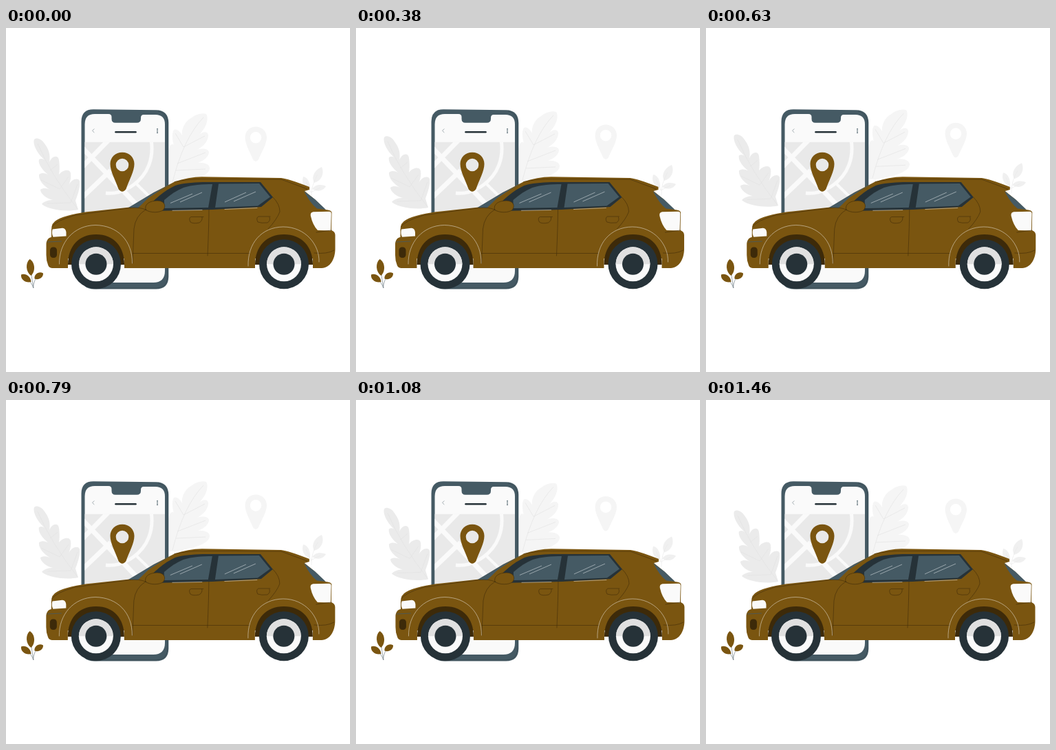
Write an HTML page that moves like this. It is 500 px wide and 500 px high and loops after 1.5 s.

```html
<!DOCTYPE html>
<html lang="en">
<head>
<meta charset="utf-8">
<title>Car and map</title>
<style>
html, body { margin: 0; width: 100%; height: 100%; overflow: hidden; background: #fff; }
svg { display: block; width: 100%; height: 100%; }
.paint { fill: #7a5510; }
.shade { fill: #3d2a09; }
.dark { fill: #263238; }
.slate { fill: #455a64; }
.light { fill: #fafafa; }
.seam { fill: none; stroke: #3d2a09; stroke-width: .55; stroke-linecap: round; stroke-linejoin: round; }
.shine { fill: none; stroke: #e9e4da; stroke-width: .55; stroke-linecap: round; }
.vein { fill: none; stroke: #e0e0e0; stroke-width: .55; }
.road { fill: none; stroke: #fafafa; }
</style>
</head>
<body>
<svg viewBox="0 0 500 500">
  <defs>
    <clipPath id="map"><path d="M114.500 165.500H231V353Q231 370 214 370H131Q114.500 370 114.500 353Z"/></clipPath>
    <g id="wheel">
      <circle r="36" class="dark"/>
      <circle r="25" class="light"/>
      <path d="M-25 0A25 25 0 0 1 25 0Z" fill="#e0e0e0"/>
      <circle r="15.500" class="dark"/>
    </g>
  </defs>

  <g id="back">
    <path fill="#ebebeb" d="M41 162C43 159 51 160 56 168C62 176 65 184 63 195C67 185 76 184 77 192C78 200 78 207 77 213C82 206 93 204 94 211C95 218 93 224 91 229C95 219 106 217 107 223C108 234 103 245 101 251L105 264C92 267 65 266 52 256C56 251 63 250 68 250C59 248 50 241 50 235C54 232 60 233 64 235C55 230 47 221 48 213C52 210 57 211 61 213C53 207 46 197 48 191C51 189 54 190 57 192C48 186 38 170 41 162Z"/>
    <path class="vein" d="M46 168Q65 213 104 263M64 207L75 198M51 221L78 234L91 216M60 255L94 254L104 227"/>
    <path fill="#f5f5f5" d="M291 125C295 131 292 145 279 157C286 149 294 150 294 156C294 166 284 175 272 180C283 173 295 175 295 181C294 190 281 197 267 199C281 193 296 196 296 204C295 216 270 222 245 226L231 225C233 211 234 199 235 188C236 178 238 168 242 169C246 170 247 174 247 179C242 168 240 154 244 148C249 146 253 151 256 156C255 146 260 136 269 131C276 125 285 123 291 125Z"/>
    <path class="vein" stroke="#ececec" d="M287 130Q258 160 242 224M258 173L289 157M249 197L290 181M258 173L246 153M247 207L290 205"/>
    <path fill="#f5f5f5" fill-rule="evenodd" d="M363 143.500C372 143.500 379 150 379 159C379 169 371 181 367 191Q363 197 359 191C355 181 347.500 169 347.500 159C347.500 150 354 143.500 363 143.500ZM363 151A8.300 8.300 0 1 0 363 167.600A8.300 8.300 0 1 0 363 151Z"/>
    <g fill="#f0f0f0">
      <path d="M459 202C463 211 459 222 448 225C443 216 449 206 459 202Z"/>
      <path d="M432 216C439 217 443 226 442 236C433 233 429 225 432 216Z"/>
      <path d="M465 230C460 238 452 238 445 234C450 227 458 227 465 230Z"/>
    </g>
    <path d="M453 213Q443 230 444 246M436 223L443 239L457 232" fill="none" stroke="#e8e8e8" stroke-width=".6"/>
  </g>

  <g id="phone">
    <path class="slate" d="M127 118.300L218 119.300Q236 119.500 236.300 138V361Q236.300 379.500 218 379.500H128Q109.500 379.500 109.500 361V136Q109.500 118.300 127 118.300Z"/>
    <path d="M221 121Q234.500 123 234.800 138V361Q234.800 377.500 218 378H128" fill="none" stroke="#37474f" stroke-width=".6"/>
    <path class="light" d="M129 125H149Q153.500 125 153.500 129.500V132Q153.500 137.800 159 137.800H190Q196 137.800 196 132V130.500Q196 126 200 126H217Q231 126 231 140V353Q231 370 214 370H131Q114.500 370 114.500 353V140Q114.500 125 129 125Z"/>
    <g clip-path="url(#map)">
      <path d="M114 165.500H232V345H114Z" fill="#e9e9e9"/>
      <path class="road" stroke-width="7" d="M107 170L205 273M107 206L150 162M108 249L152 207"/>
      <path class="road" stroke-width="5" d="M211 163C215 188 207 213 184 229C169 239 158 241 145 240"/>
      <path class="road" stroke-width="4" d="M190 227L233 269"/>
    </g>
    <path d="M159.500 151.300H188.500" stroke="#263238" stroke-width="2.600" stroke-linecap="round"/>
    <path d="M128.300 146.500L125.500 149.300L128.300 152" fill="none" stroke="#8c989e" stroke-width=".8"/>
    <g class="slate"><circle cx="220" cy="147" r=".9"/><circle cx="220" cy="149.600" r=".9"/><circle cx="220" cy="152.200" r=".9"/></g>
    <path class="paint" fill-rule="evenodd" d="M169 180.700C179 180.700 186.500 188 186.500 197.500C186.500 208 179.500 220 174.500 234Q169 241.500 163.500 234C158.500 220 151.500 208 151.500 197.500C151.500 188 159 180.700 169 180.700ZM169 189.700A9.300 9.300 0 1 0 169 208.300A9.300 9.300 0 1 0 169 189.700Z"/>
  </g>

  <g id="plant">
    <path d="M36 348Q37 363 40 378M28 363Q36 367 40 378M48 360Q40 365 39.500 378" fill="none" stroke="#78858b" stroke-width=".7"/>
    <g class="paint">
      <path d="M34.500 336C42 340 43.500 353 36.500 360C28.500 355 28 341 34.500 336Z"/>
      <path d="M54 356.500C54.500 363 47 367 41.500 364.500C40.500 358 48 353 54 356.500Z"/>
      <path d="M22 358.500C28 356 36 361 36.500 369C29 371 21 366 22 358.500Z"/>
    </g>
  </g>

  <g id="car">
    <path class="paint" d="M61 344Q58.500 338 58.500 330V315C58.500 309 61 305 66 304V293Q66 283 74 279C84 273 105 268.500 125 266.500L180 260.500L215 239L245 223.500C258 219 272 216.500 285 216.300L400 218Q410 219 441 231L441 235L434 237L450 250L464 264Q473 264.500 473.500 268L473 294Q478.500 296 478.500 301V321C478.500 336 471 348.500 459 349H446V335H362V349H172V335H90V349H67Q62 348.500 61 344Z"/>
    <path class="slate" d="M178 261L215 239L245 224.500L227 234L207 247L192 261.500Z"/>
    <path class="dark" d="M203 265C214 249 231 236 246 229C257 225.500 270 224.500 286 224H370L388 246L371 260L300 264L214 266Z"/>
    <path class="slate" d="M230 262V250C239 242 248 236 258 232C270 228 286 227 300 227L294 261Z"/>
    <path class="slate" d="M309 226.500L368 226L384 245.500L366 258.500L304 261Z"/>
    <path d="M239 254.500L271 241M253 253L285 239M318 253L349 239M331 252L363 238" fill="none" stroke="#d3dade" stroke-width=".6"/>
    <path class="paint" d="M203 264C201 256 209 251 220 251C230 251 233 258 229 264C224 269 209 269 203 264Z" stroke="#3d2a09" stroke-width=".6"/>
    <path class="slate" d="M433 237L449 249L465 264L452 262.500Q443 256 433 237Z"/>
    <path class="light" d="M446.500 267.200L470 266.700Q472.800 266.800 472.800 270L472 294.500L453 294Q446 287 442.800 273Q442 268 446.500 267.200Z"/>
    <path class="light" d="M67.500 292.500L82 290.700Q87 291 87.500 297V302.500L68.500 303.700Q66 299 67.500 292.500Z"/>
    <rect class="shade" x="64" y="318.500" width="10" height="15.500" rx="4.500"/>
    <path d="M60 311L81 310" stroke="#455a64" stroke-width=".8"/>

    <path class="seam" d="M67 289Q72 280 101 272Q143 266 181 261.500M181 261.500Q194 260 203 264M203 264Q188 273 186 292L184 342M295 264Q295 285 293 331M388 246Q398 256 398 267Q394 278 381 292M184 327.500H354M245 223.500Q268 219 287 219.500L400 220L438 234M473 294L451 297M448 327Q467 329 477 323"/>
    <path class="seam" d="M287 274.500H269Q265 276 268 282Q272 285 281 283Q286 280 285 275M384 274H367Q363 276 366 282Q371 284 380 283Q385 280 383 275"/>
    <path class="shine" d="M242 265.300L285 264.500M318 263.500L365 261.500"/>
    <path class="shine" d="M77.500 343C77 312 98 287 130 286.500C162 287 184 309 183.500 342M352 346C351 313 371 289.500 403 289C435 289 456 315 455 340"/>

    <path class="shade" d="M90 344C90 318 105 300 131 300C157 300 172 318 172 344Z"/>
    <path class="shade" d="M362 344C362 318 378 300 404 300C430 300 446 318 446 344Z"/>
    <use href="#wheel" x="131" y="343.300"/>
    <use href="#wheel" x="404" y="343.300"/>
  </g>
</svg>
<script>
const LOOP = 1500, RISE = 6;
const SHAKE = [0, -.5, 1, -2, 2, -2, 2, -2, 1, -.5, 0];
const back = document.getElementById('back');
const car = document.getElementById('car');

function bezier(x1, y1, x2, y2) {
  const at = (a, b, s) => 3 * a * s * (1 - s) ** 2 + 3 * b * s * s * (1 - s) + s ** 3;
  return x => {
    let lo = 0, hi = 1;
    for (let i = 0; i < 20; i++) {
      const mid = (lo + hi) / 2;
      if (at(x1, x2, mid) < x) lo = mid; else hi = mid;
    }
    return at(y1, y2, (lo + hi) / 2);
  };
}
const ease = bezier(.25, .1, .25, 1);
const easeInOut = bezier(.42, 0, .58, 1);

function draw(ms) {
  const p = (ms % LOOP) / LOOP;
  const lift = RISE * easeInOut(1 - Math.abs(1 - 2 * p));
  const step = Math.floor(p * 10);
  const from = SHAKE[step], to = SHAKE[step + 1];
  const shift = from + (to - from) * ease(p * 10 - step);
  back.setAttribute('transform', `translate(0 ${-lift})`);
  car.setAttribute('transform', `translate(${shift} 0)`);
}

const start = performance.now();
function tick() {
  draw(performance.now() - start);
  requestAnimationFrame(tick);
}
tick();
</script>
</body>
</html>
```
